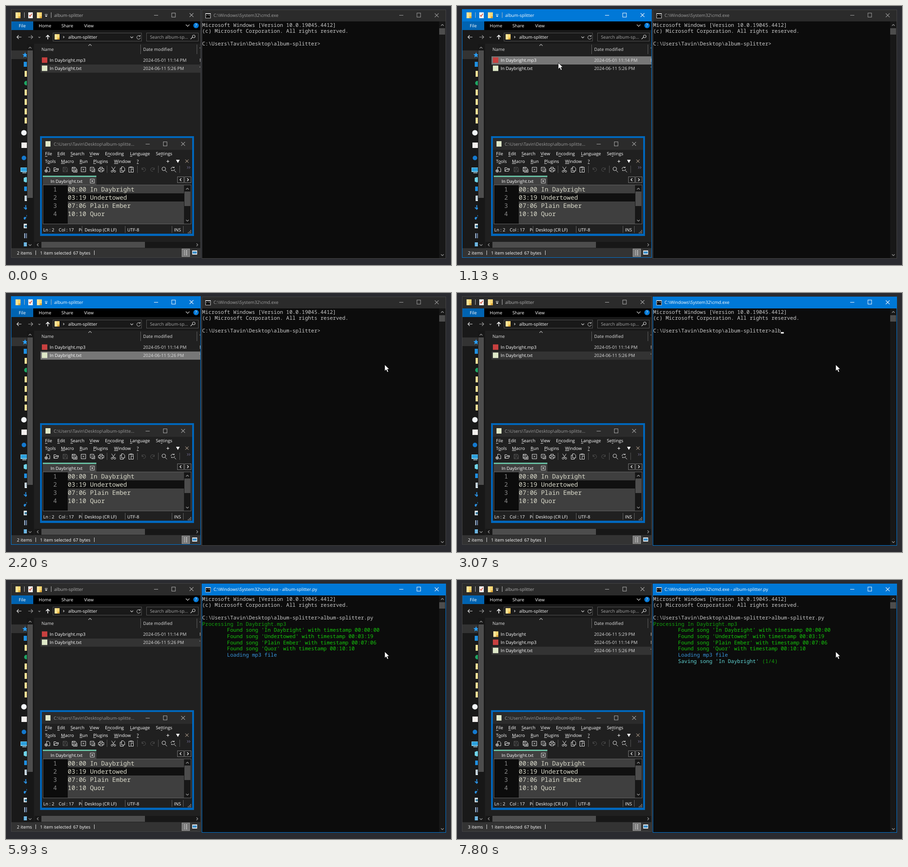
Write an HTML page with a canvas that moves like this. It is 980 by 571 pixels and loops after 8 s.

```html
<!DOCTYPE html>
<html lang="en">
<head>
<meta charset="utf-8">
<title>album-splitter</title>
<style>
html, body { margin: 0; width: 100%; height: 100%; overflow: hidden; background: #2a2b30; }
canvas { display: block; }
</style>
</head>
<body>
<canvas id="stage" width="980" height="571"></canvas>
<script>
const ctx = document.getElementById('stage').getContext('2d');
const LOOP = 8000, CELL_W = 6.857, CELL_H = 13.714;
const UI = '"Open Sans", "Noto Sans", sans-serif';
const MONO = '"Noto Sans Mono", "DejaVu Sans Mono", monospace';
const BLUE = '#0078d7', WHITE = '#ffffff', PANEL = '#202020', DEEP = '#191919';
const TRACK = '#171717', THUMB = '#4d4d4d', FOLDER = '#fbd775', FRAME = '#0067bd';
const USER = 'Tavin', ALBUM = 'In Daybright';
const SONGS = [['00:00', ALBUM], ['03:19', 'Undertowed'], ['07:06', 'Plain Ember'], ['10:10', 'Quor']];
const COMMAND = 'album-splitter.py';
const KEY_TIMES = [2800, 2930, 3070, 3200, 3330, 3600, 3670, 3800, 3870,
  4070, 4130, 4200, 4400, 4470, 4530, 4730, 4800];

// --- drawing helpers ---
function box(x, y, w, h, color) {
  ctx.fillStyle = color;
  ctx.fillRect(x, y, w, h);
}
function outline(x, y, w, h, color) {
  ctx.strokeStyle = color;
  ctx.lineWidth = 1;
  ctx.strokeRect(x + .5, y + .5, w - 1, h - 1);
}
function disc(x, y, r, color) {
  ctx.fillStyle = color;
  ctx.beginPath();
  ctx.arc(x, y, r, 0, 7);
  ctx.fill();
}
function at(x, y, draw) {
  ctx.save();
  ctx.translate(x, y);
  draw();
  ctx.restore();
}
function line(d, x, y, color = WHITE, width = 1) {
  at(x, y, () => {
    ctx.strokeStyle = color;
    ctx.lineWidth = width;
    ctx.stroke(new Path2D(d));
  });
}
function solid(d, x, y, color = WHITE) {
  at(x, y, () => {
    ctx.fillStyle = color;
    ctx.fill(new Path2D(d));
  });
}
// y is the middle of the capital letters
function text(s, x, y, color = WHITE, size = 9.75, family = UI) {
  ctx.font = `${size}px ${family}`;
  ctx.fillStyle = color;
  ctx.fillText(s, x, y + size * .36);
  return x + ctx.measureText(s).width;
}
function clipped(x, y, w, h, draw) {
  ctx.save();
  ctx.beginPath();
  ctx.rect(x, y, w, h);
  ctx.clip();
  draw();
  ctx.restore();
}
const up = (x, y, c = '#999', s = 3) => line(`M${-s} ${s / 2}l${s} ${-s} ${s} ${s}`, x, y, c, 1.2);
const down = (x, y, c = '#999', s = 3) => line(`M${-s} ${-s / 2}l${s} ${s} ${s} ${-s}`, x, y, c, 1.2);
const left = (x, y, c = '#999', s = 3) => line(`M${s / 2} ${-s}l${-s} ${s} ${s} ${s}`, x, y, c, 1.2);
const right = (x, y, c = '#999', s = 3) => line(`M${-s / 2} ${-s}l${s} ${s} ${-s} ${s}`, x, y, c, 1.2);

function folder(x, y, w = 11, h = 13) {
  box(x, y, w, h, FOLDER);
  box(x, y, w * .45, h, '#ffe59b');
  box(x + w * .6, y + h - 4, w * .4, 4, '#dda93a');
}
function controls(x, y, color) {
  line('M-4.5 0h9', x, Math.floor(y) + .5, color);
  outline(x + 34, Math.floor(y) - 5, 9, 10, color);
  line('M-4.2-4.2l8.4 8.4M4.2-4.2l-8.4 8.4', x + 78, y, color, 1.1);
}

// --- timeline ---
const ease = p => p * p * (3 - 2 * p);
const MOVES = [[130, 930, 966, 560], [1270, 1530, 223, 125], [1870, 2200, 221, 139]];
const REST = [834, 158];

function pointerAt(t) {
  let pos = null;
  MOVES.forEach(([start, end, x, y], i) => {
    if (t < start) return;
    const [tx, ty] = MOVES[i + 1] ? MOVES[i + 1].slice(2) : REST;
    const p = ease(Math.min(1, (t - start) / (end - start)));
    pos = [x + (tx - x) * p, y + (ty - y) * p];
  });
  return pos;
}

// --- file browser ---
function sidePane() {
  box(12, 83, 50, 451, DEEP);
  box(12, 98, 34, 19, '#333333');
  clipped(12, 83, 34, 451, () => {
    solid('M0-6l1.7 4 4.3.3-3.3 2.8 1 4.3L0 3l-3.7 2.4 1-4.3L-6-1.7l4.3-.3z', 42, 108, '#2a9df4');
    box(39, 123, 9, 11, '#1f8fe0');
    [143, 184, 205, 226, 246].forEach(y => folder(41, y, 10));
    disc(45, 170, 5, '#1fa463');
    disc(39.5, 279.5, 6, '#f2f6fa');
    box(34, 301, 12, 12, '#f4f0ee');
    disc(39.5, 335, 5, '#1479cf');
    box(32, 356, 16, 10, '#7fd0f5');
    box(33, 357, 13, 7, '#2a9fdc');
    box(36, 367, 9, 1.5, '#b8d9e8');
    solid('M0-6l6 2v8l-6 2-5-2v-8z', 44, 383, '#6fd3e8');
    box(40, 398, 9, 10, '#1f8fe0');
    box(41, 418, 7, 12, '#dce6ee');
    line('M2-5h4M2-2h4M2 1h4', 41, 425, '#62839c');
    line('M0-5v9M-4 0l4 4 4-4', 43.5, 444, '#2a8fe0', 2);
    solid('M-4 3a3 3 0 1 1 3-3V-7h2', 46, 468, '#2a8fe0');
    box(39, 480, 9, 10, '#e4eef4');
    box(41, 483, 6, 5, '#407b9c');
    box(40, 501, 7, 11, '#9fb0c4');
    box(42, 501, 3, 11, '#324560');
    box(39, 521, 8, 9, '#3a9ad4');
    line('M0 0h7M0 3h7M0 6h7', 40, 522.5, '#d8e8f0');
  });
  box(46, 84, 14, 449, TRACK);
  box(47, 98, 12, 325, THUMB);
  up(53, 92);
  down(53, 527);
}

function fileIcon(kind, y) {
  if (kind === 'folder') folder(80, y - 6, 11, 12);
  else box(79, y - 6, 12, 12, kind === 'mp3' ? '#c8403f' : '#dfe8c8');
}

function fileRows(t, active, pointer) {
  const selected = t >= 1130 && t < 1670 ? 'mp3' : 'txt';
  const rows = [['mp3', ALBUM + '.mp3', '2024-05-01 11:14 PM', 'M'],
    ['txt', ALBUM + '.txt', '2024-06-11 5:26 PM', 'T']];
  if (t >= 7800) rows.unshift(['folder', ALBUM, '2024-06-11 5:29 PM', 'F']);
  clipped(62, 83, 366, 437, () => rows.forEach(([kind, name, date, type], i) => {
    const top = 111 + 18 * i, y = top + 8.8;
    const hover = pointer && pointer[0] > 76 && pointer[0] < 428 &&
      pointer[1] >= top && pointer[1] < top + 18;
    if (kind === selected) box(76, top, 352, 18, active ? '#777777' : '#333333');
    else if (hover) box(76, top, 352, 18, THUMB);
    fileIcon(kind, y - .5);
    text(name, 96, y);
    text(date, 302, y, '#dedede');
    text(type, 426, y, '#dedede');
  }));
}

function browser(t, pointer) {
  const active = t >= 1130 && t < 2270;
  const tone = active ? WHITE : '#b0b0b0';
  box(11, 7, 418, 548, active ? BLUE : '#444444');
  box(12, 8, 416, 546, PANEL);
  box(12, 8, 416, 26, active ? BLUE : '#2b2b2b');
  folder(21, 14);
  box(40, 14, 1, 12, '#b8b8b8');
  box(49, 14, 10, 13, '#f4f4f4');
  line('M-3 0l2 3 4-6', 54, 20, '#d04a30', 1.5);
  folder(68, 14);
  line('M-3 0h6', 88.5, 18.5, WHITE);
  solid('M-3 0h6l-3 3z', 88.5, 21, WHITE);
  box(99, 14, 1, 12, '#b8b8b8');
  text('album-splitter', 106, 20, tone);
  controls(330.5, 20, tone);

  box(12, 34, 416, 19, '#000000');
  box(12, 34, 48, 19, '#0063b1');
  [['File', 28], ['Home', 72], ['Share', 122], ['View', 172]].forEach(([s, x]) => text(s, x, 43.5));
  down(400, 43, '#cccccc', 4);
  disc(418.5, 43, 6, BLUE);
  text('?', 416.3, 43, WHITE, 9.5);

  box(12, 53, 416, 30, DEEP);
  line('M10 0h-10M4-4l-4 4 4 4', 24, 68.5, '#dddddd', 1.2);
  line('M0 0h10M6-4l4 4-4 4', 49, 68.5, '#999999', 1.2);
  down(73.5, 69, '#999', 2);
  line('M0 5v-9M-4 0l4-4 4 4', 92, 68.5, WHITE, 1.6);
  outline(103, 59, 196, 19, '#535353');
  folder(107, 62, 11, 12);
  right(127, 68.5, '#ccc', 2);
  text('album-splitter', 137, 68.5);
  down(277, 69, '#ccc');
  line('M3-2.5A4 4 0 1 0 4 1M3.5-5v3h-3', 292, 69, '#cccccc');
  outline(309, 59, 115, 19, '#535353');
  text('Search album-sp...', 317, 68.5, '#a6a6a6');
  line('M-5 4l4-4M5-2a3 3 0 1 1-6 0a3 3 0 1 1 6 0', 411.5, 69, '#cccccc', 1.2);

  box(62, 83, 366, 437, PANEL);
  sidePane();
  up(185, 86, '#aaa', 3.5);
  text('Name', 78, 95, '#dedede');
  text('Date modified', 302, 95, '#dedede');
  box(296, 85, 1, 21, '#636363');
  box(420, 85, 1, 21, '#636363');
  clipped(62, 83, 366, 28, () => text('T', 426, 95, '#dedede'));
  fileRows(t, active, pointer);

  box(63, 520, 365, 13, TRACK);
  box(78, 520, 228, 13, THUMB);
  left(70, 526.5);
  right(421, 526.5);
  box(12, 534, 416, 20, '#333333');
  text(t >= 7800 ? '3 items' : '2 items', 24, 544.5);
  box(65, 539, 1, 10, '#dddddd');
  text('1 item selected', 75, 544.5);
  const end = text(t >= 1330 && t < 1930 ? '31.2 MB' : '67 bytes', 148, 544.5);
  box(Math.round(end + 8), 539, 1, 10, '#dddddd');
  box(387, 535, 18, 18, '#777777');
  outline(387, 535, 18, 18, '#999999');
  line('M0 0h2M0 3h2M0 6h2M0 9h2M4 0h3M4 3h3M4 6h3M4 9h3', 392, 539.5);
  box(410, 539, 11, 9, '#eeeeee');
  box(411, 541, 9, 5, '#3b8ec8');
}

// --- text editor ---
const PAGE = 'M-3-5h5l2 2v8h-7z';
const FLOPPY = 'M-5-5h8l2 2v8h-10zM-3-5v3h5v-3M-3 5v-4h6v4';
const UNDO = 'M-4-4v4h4M-4 0a4 4 0 1 1 3 4';
const LENS = 'M3-1.5a4 4 0 1 1-8 0a4 4 0 1 1 8 0M2 2l4 4';
const TOOLS = [
  [91, 'M-2-1v-4h4l3 3v7h-4M-3 0v6M-6 3h6M0 3a3 3 0 1 1-6 0a3 3 0 1 1 6 0'],
  [110, 'M-5 4v-8h4l1 2h5v2M-5 4l2-4h8l-2 4z'],
  [130, FLOPPY, 1],
  [150, 'M-5-5h7l2 2v7h-9zM-3-5v3h4v-3M-3 4v-3h5v3M6-1v7h-9'],
  [170, 'M-5-5h10v10h-10zM-2-2l4 4M2-2l-4 4'],
  [190, 'M-5-5h8v8h-8zM-2.5-2.5l3 3M.5-2.5l-3 3M5-2v7h-7'],
  [209, 'M-3-2v-3h6v3M-3 3h-3v-5h12v5h-3M-3 1h6v4h-6z'],
  [236, 'M-4-6l6 9M4-6l-6 9M-1 4a2 2 0 1 1-4 0a2 2 0 1 1 4 0M5 4a2 2 0 1 1-4 0a2 2 0 1 1 4 0'],
  [256, 'M-2-6h4l3 3v6h-7zM-2-3h-3v9h7v-3'],
  [275, 'M-2-5h-3v11h4M2-5h3v3M-2-6h4v2h-4zM0-1h5v7h-5z'],
  [303, UNDO, 1],
  [322, 'M4-4v4h-4M4 0a4 4 0 1 0-3 4', 1],
  [348, LENS],
  [368, 'M-5-1a4 4 0 0 1 7-3v-2M2-4h-3M3-1a4 4 0 0 1-7 2v2M2 2l4 4']
];
const MENUS = [
  [325.5, [['File', 86, 0], ['Edit', 113, 0], ['Search', 142, 0], ['View', 184, 0],
    ['Encoding', 218, 1], ['Language', 273, 0], ['Settings', 330, 2]]],
  [342, [['Tools', 86, 1], ['Macro', 121, 0], ['Run', 162, 0], ['Plugins', 192, 0],
    ['Window', 238, 0], ['?', 288, 0]]]
];

function menuItem(label, x, y, key) {
  text(label, x, y);
  const start = x + ctx.measureText(label.slice(0, key)).width;
  box(start, Math.round(y + 5), ctx.measureText(label[key]).width, 1, '#dddddd');
}

function editor() {
  box(75, 287, 339, 220, FRAME);
  box(79, 291, 331, 211, PANEL);
  box(79, 291, 331, 26, '#2b2b2b');
  box(87, 298, 11, 12, '#dfe8c8');
  text(`C:\\Users\\${USER}\\Desktop\\album-splitte...`, 105, 304, '#9a9a9a');
  controls(312, 304, '#aaaaaa');
  MENUS.forEach(([y, items]) => items.forEach(([s, x, key]) => menuItem(s, x, y, key)));
  line('M-3 0h6M0-3v6', 356.5, 342.5);
  solid('M-4-3h8l-4 7z', 378.5, 342);
  line('M-3.5-3.5l7 7M3.5-3.5l-7 7', 398.5, 342, '#e0c8b0');

  TOOLS.forEach(([x, d, dim]) => line(d, x + .5, 360.5, dim ? '#565656' : '#e4e4e4'));
  [222, 289, 335, 382].forEach(x => box(x, 352, 1, 16, '#555555'));
  line('M0-2.5l2.5 2.5-2.5 2.5M4-2.5l2.5 2.5-2.5 2.5', 399, 356, '#8580b0');

  box(81, 374, 118, 21, '#404040');
  box(81, 374, 118, 3, '#68bfa2');
  text(ALBUM + '.txt', 98, 386);
  outline(185, 381, 10, 10, '#cccccc');
  line('M-2-2l4 4M2-2l-4 4', 190, 386);
  outline(377, 376, 15, 14, '#777777');
  outline(393, 376, 15, 14, '#777777');
  left(384.5, 383, WHITE);
  right(400.5, 383, WHITE);

  box(81, 394, 327, 87, '#646464');
  box(82, 395, 325, 85, '#3f3f3f');
  box(82, 395, 54, 85, '#0c0c0c');
  box(136, 413, 256, 18, '#101010');
  SONGS.forEach((song, i) => {
    const y = 404.5 + 18 * i;
    text(String(i + 1), 104, y, '#8a8a8a', 13.6, MONO);
    text(song.join(' '), 136, y, '#dcdccc', 13.6, MONO);
  });
  box(392, 395, 15, 85, TRACK);
  box(393, 409, 13, 32, THUMB);
  up(399.5, 403);
  down(399.5, 473);

  text('Ln : 2', 82, 493.5);
  text('Col : 17', 116, 493.5);
  clipped(158, 484, 9.5, 18, () => text('Pos', 160, 493.5));
  text('Desktop (CR LF)', 173, 493.5);
  text('UTF-8', 267, 493.5);
  text('INS', 370, 493.5);
  [167, 262, 365, 390].forEach(x => box(x, 485, 1, 15, '#646464'));
  for (let r = 0; r < 3; r++) {
    for (let c = 0; c <= r; c++) box(406 - c * 2.7, 494 + r * 2.7, 1.5, 1.5, '#bbbbbb');
  }
}

// --- console ---
const PROMPT = `C:\\Users\\${USER}\\Desktop\\album-splitter>`;
const rowTop = row => 34.6 + row * CELL_H;

function print(row, col, s, color = '#cccccc') {
  text(s, 432 + col * CELL_W, rowTop(row) + 7, color, 11.43, MONO);
}
function caret(row, col) {
  box(432 + col * CELL_W, rowTop(row) + 10.4, CELL_W - .3, 3.3, '#f2f2f2');
}

function consoleOutput(t) {
  print(0, 0, 'Microsoft Windows [Version 10.0.19045.4412]');
  print(1, 0, '(c) Microsoft Corporation. All rights reserved.');
  const typed = KEY_TIMES.filter(k => t >= k).length;
  print(3, 0, PROMPT + COMMAND.slice(0, typed));
  if (typed && t < 4870 && !(t >= 3270 && t < 3330)) caret(3, PROMPT.length + typed);
  if (t >= 5130 && t < 5200) caret(4, 0);
  if (t >= 5200) {
    print(4, 0, `Processing ${ALBUM}.mp3`, '#13a10e');
    SONGS.forEach(([time, name], i) =>
      print(5 + i, 8, `Found song '${name}' with timestamp 00:${time}`, '#16c60c'));
    if (t < 5330) caret(9, 0);
  }
  if (t >= 5330) {
    print(9, 8, 'Loading mp3 file', '#3a96dd');
    if (t < 5930 || t >= 6470 && t < 6730) caret(10, 0);
  }
  if (t >= 6730) {
    const saving = `Saving song '${ALBUM}' `;
    print(10, 8, saving, '#61d6d6');
    print(10, 8 + saving.length, '(1/4)', '#13a10e');
    if (t < 6800) caret(10, 13 + saving.length);
    else if (t < 7530) caret(11, 0);
  }
}

function terminal(t) {
  const active = t >= 2270;
  const tone = active ? WHITE : '#a0a0a0';
  box(431, 8, 538, 549, active ? BLUE : '#444444');
  box(432, 9, 536, 25, active ? BLUE : '#2b2b2b');
  box(432, 34, 536, 522, '#0c0c0c');
  box(439, 16, 12, 11, '#d0d0d0');
  box(440, 18, 10, 8, '#000000');
  line('M0 0h2M4 0h1M6-2l2 3', 441, 21.5, '#eeeeee');
  text('C:\\Windows\\System32\\cmd.exe' + (t >= 5130 ? ' - album-splitter.py' : ''), 457, 20.8, tone);
  controls(870.5, 20.5, tone);
  box(954, 34, 14, 522, TRACK);
  box(954, 49, 13, 14, THUMB);
  up(961, 42);
  down(961, 549);
  consoleOutput(t);
}

function arrow([x, y]) {
  const d = 'M0 0v14.2l3.3-3.2 2.4 5.6 2.6-1.1-2.4-5.4h4.4z';
  solid(d, x, y);
  line(d, x, y, '#000000', .8);
}

function draw(ms) {
  // the screen was sampled at 15 steps a second
  const step = Math.floor((ms + 4) * 15 / 1000);
  const t = Math.round(step * 100 / 15) * 10;
  const pointer = pointerAt(t);
  ctx.textRendering = 'geometricPrecision';
  box(0, 0, 980, 571, '#2a2b30');
  browser(t, pointer);
  editor();
  terminal(t);
  if (pointer) arrow(pointer);
}

const origin = performance.now();
function tick() {
  draw((performance.now() - origin) % LOOP);
  requestAnimationFrame(tick);
}
tick();
</script>
</body>
</html>
```
